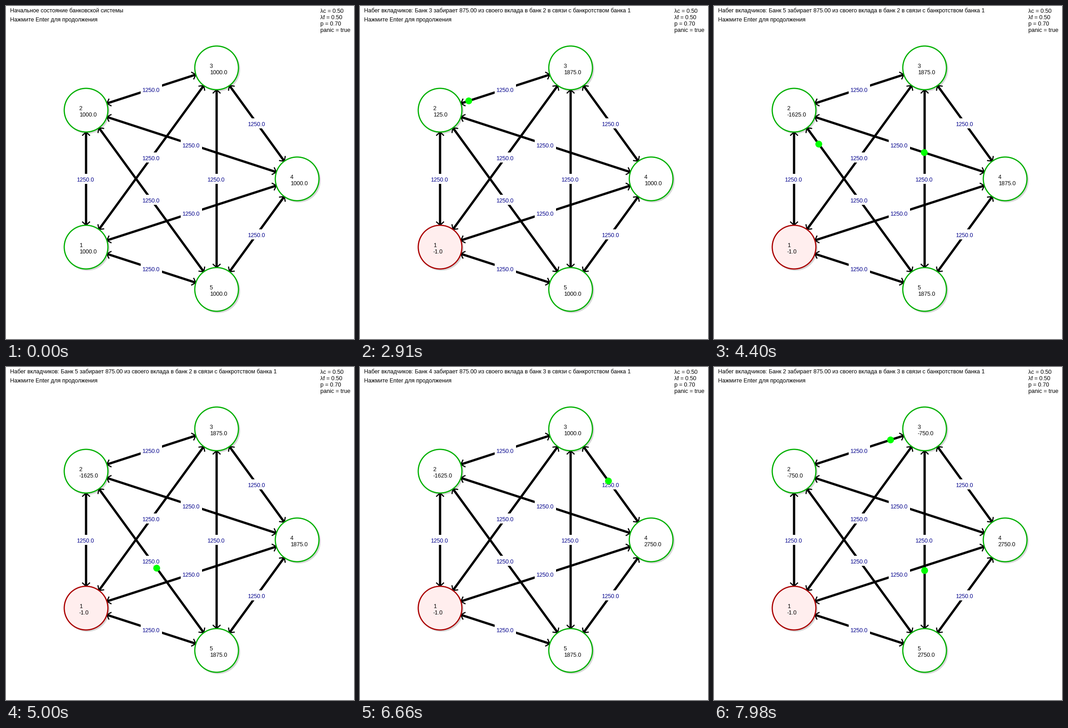
These frames come from a looping animation (765x732 px, 8000 ms). A matplotlib script:

```python
import math
from itertools import combinations

import matplotlib.pyplot as plt
from matplotlib.animation import FuncAnimation
from matplotlib.patches import Circle, Rectangle

WIDTH, HEIGHT, DPI = 765, 732, 96
LOOP, INTERVAL = 8000, 20
TICK, TICK_OFFSET = 100 / 3, 9

CENTER, RING, RADIUS = (384, 380), 256.4, 48
GREEN, RED, PALE_RED = "#00b000", "#aa0000", "#ffeeee"
AMOUNT = 875.0

TITLES = [
    (0, "Начальное состояние банковской системы"),
    (1030, "Начало моделирования: выбирается банк – банкрот"),
    (1830, "Банк 1 становится банкротом"),
]
FAILURE_TIME = 1830
RUN_TITLE = ("Набег вкладчиков: Банк {} забирает {:.2f} из своего вклада "
             "в банк {} в связи с банкротством банка 1")

# (title time, payer, receiver, departure, travel time)
TRANSFERS = [
    (2570, 2, 3, 2549, 1638),
    (3340, 2, 4, 3320, 1765),
    (4080, 2, 5, 4086, 1706),
    (5880, 3, 4, 5882, 1618),
    (6940, 3, 5, 6934, 1629),
    (7540, 3, 2, 7548, 1639),
]


def bank_position(bank):
    """Corner of a regular pentagon, on whole pixels."""
    angle = math.radians(72 * (bank - 4))
    return (math.floor(CENTER[0] + RING * math.cos(angle)),
            math.floor(CENTER[1] + RING * math.sin(angle)))


BANKS = {bank: bank_position(bank) for bank in range(1, 6)}

plt.rcParams["font.family"] = "Liberation Sans"
plt.rcParams["font.size"] = 12.48 * 72 / DPI

fig = plt.figure(figsize=(WIDTH / DPI, HEIGHT / DPI), dpi=DPI, facecolor="white")
ax = fig.add_axes([0, 0, 1, 1])
ax.set_xlim(0, WIDTH)
ax.set_ylim(HEIGHT, 0)
ax.axis("off")


def px(size):
    return size * 72 / DPI


def write(x, y, text="", color="black"):
    return ax.text(x, y, text, color=color, va="baseline", ha="left", zorder=6)


def stroke(points, width):
    ax.plot(*zip(*points), color="black", lw=px(width), zorder=2, snap=False,
            solid_capstyle="butt", solid_joinstyle="miter")


def arrow_head(tip, ux, uy):
    """Open head at tip; (ux, uy) points back along the line."""
    back, side = 8, 8.5
    arms = [(tip[0] + back * ux - s * side * uy, tip[1] + back * uy + s * side * ux)
            for s in (1, -1)]
    stroke([arms[0], tip, arms[1]], 2.5)


def draw_link(a, b):
    (x0, y0), (x1, y1) = BANKS[a], BANKS[b]
    length = math.hypot(x1 - x0, y1 - y0)
    ux, uy = (x1 - x0) / length, (y1 - y0) / length
    start = (x0 + RADIUS * ux, y0 + RADIUS * uy)
    end = (x1 - RADIUS * ux, y1 - RADIUS * uy)
    stroke([start, end], 5)
    arrow_head(start, ux, uy)
    arrow_head(end, -ux, -uy)
    mx, my = (x0 + x1) / 2, (y0 + y1) / 2
    ax.add_patch(Rectangle((mx - 23.5, my - 11), 47, 22, fc="white", ec="none", zorder=3))
    label = write(mx - 20.7, my + 6.4, "1250.0", "#00008b")
    label.set_zorder(3.5)


for x, y in BANKS.values():
    ax.add_patch(Circle((x + 3, y + 3), RADIUS + 0.8, fc="#d6d6d6", ec="none", zorder=1))
for pair in combinations(BANKS, 2):
    draw_link(*pair)

discs, balance_texts = {}, {}
for bank, (x, y) in BANKS.items():
    discs[bank] = ax.add_patch(Circle((x, y), RADIUS, lw=px(2.6), zorder=5))
    write(x - 15.3, y, str(bank))
    balance_texts[bank] = write(x - 15.3, y + 14.3)

dots = [ax.add_patch(Circle((0, 0), 7.5, fc="#00ff00", ec="none", zorder=4))
        for _ in TRANSFERS]

title = write(9, 14.4)
write(9, 34, "Нажмите Enter для продолжения")
for row, line in enumerate(["λc = 0.50", "λf = 0.50", "p = 0.70", "panic = true"]):
    write(691.2, 14.6 + 14.2 * row, line)


def update(frame):
    t = (frame + 0.5) * INTERVAL
    motion_time = math.floor((t - TICK_OFFSET) / TICK) * TICK + TICK_OFFSET

    heading = [text for begin, text in TITLES if t >= begin][-1]
    failed = t >= FAILURE_TIME
    balances = dict.fromkeys(BANKS, 1000.0)
    if failed:
        balances[1] = -1.0

    for dot, (begin, payer, receiver, departure, travel) in zip(dots, TRANSFERS):
        if t >= begin:
            heading = RUN_TITLE.format(receiver, AMOUNT, payer)
            balances[payer] -= AMOUNT
            balances[receiver] += AMOUNT
        progress = (motion_time - departure) / travel
        dot.set_visible(0 <= progress <= 1)
        (x0, y0), (x1, y1) = BANKS[payer], BANKS[receiver]
        dot.center = (x0 + (x1 - x0) * progress, y0 + (y1 - y0) * progress)

    title.set_text(heading)
    for bank, disc in discs.items():
        bankrupt = failed and bank == 1
        disc.set_edgecolor(RED if bankrupt else GREEN)
        disc.set_facecolor(PALE_RED if bankrupt else "white")
        balance_texts[bank].set_text(f"{balances[bank]:.1f}")
    return [title, *dots, *discs.values(), *balance_texts.values()]


animation = FuncAnimation(fig, update, frames=LOOP // INTERVAL, interval=INTERVAL,
                          init_func=lambda: update(0), repeat=True, repeat_delay=0)
plt.show()
```
